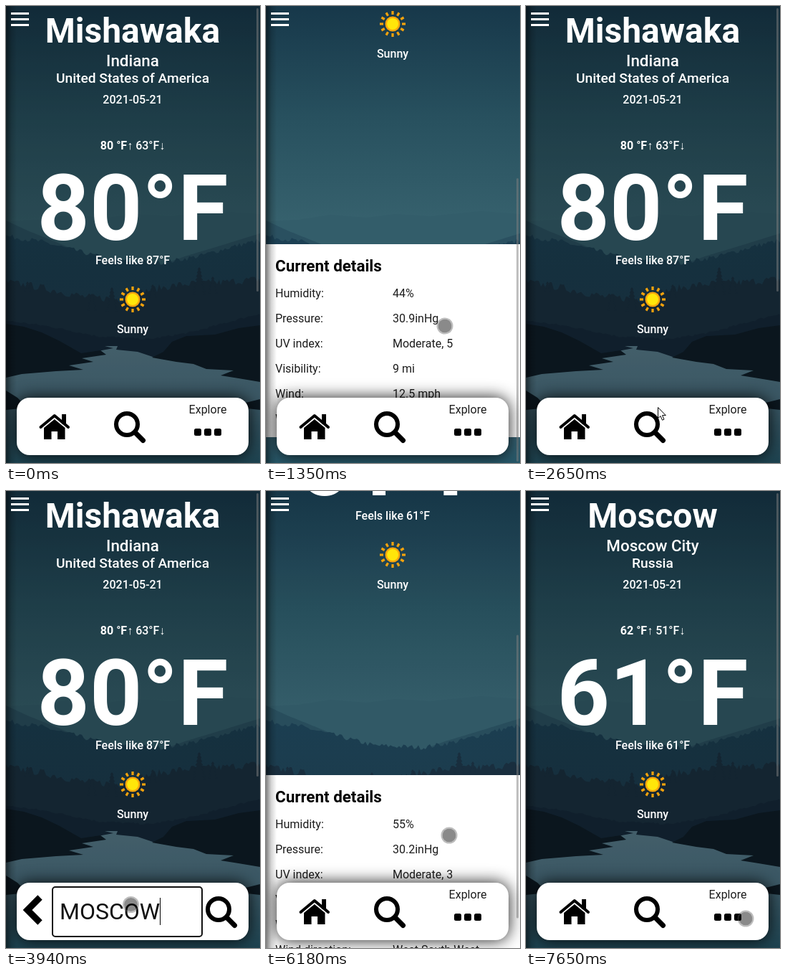
Animation, 355 px wide and 637 px high, one loop 7690 ms. Source, as an HTML page:

```html
<!DOCTYPE html>
<html lang="en">
<head>
<meta charset="utf-8">
<title>Weather</title>
<style>
html, body { margin: 0; width: 100%; height: 100%; overflow: hidden; }
#stage { position: relative; width: 355px; height: 637px; overflow: hidden; font: 16px Roboto, "Liberation Sans", sans-serif; }
#stage > *, #page > *, #nav > * { position: absolute; }
#scene, #dim { left: 0; top: 0; width: 355px; height: 637px; }
#dim { background: #000; }
#page { left: 0; top: 0; width: 355px; height: 1021px; }
.t { left: 0; width: 354px; line-height: 0; text-align: center; font-weight: 500; color: #fff; white-space: nowrap; }
.t i { font: 16px/0 "Liberation Sans", sans-serif; }
#sun { left: 157px; top: 389px; }
#panel { left: 0; top: 716px; width: 355px; height: 269px; background: #fff; }
#panel * { position: absolute; left: 13px; line-height: 0; white-space: nowrap; color: #1c1c1c; }
#panel h2 { margin: 0; top: 30px; font-size: 22.4px; color: #000; }
#panel .v { left: 177px; }
#edge { left: 0; top: 0; width: 15px; height: 637px; background: linear-gradient(90deg, rgba(0,0,0,.5), rgba(0,0,0,.16) 50%, transparent); }
#burger { left: 7px; top: 9px; width: 25px; height: 3px; background: #fff; box-shadow: 0 8px #fff, 0 16px #fff; }
#thumb { left: 350px; top: 3px; width: 3px; height: 395px; border-radius: 2px; background: rgba(128,128,128,.5); }
#nav { left: 15px; top: 546px; width: 324px; height: 80px; border-radius: 18px; background: #fff; box-shadow: 0 0 22px rgba(0,0,0,.9); }
#nav svg { left: -15px; top: -546px; }
#explore { left: 207px; width: 120px; top: 17px; line-height: 0; text-align: center; color: #1c1c1c; }
#field { left: 49px; top: 5px; width: 207px; height: 67px; border: 2px solid #111; border-radius: 5px; font-size: 32px; color: #111; }
#typed { position: absolute; left: 9px; top: 33px; line-height: 0; }
#caret { position: absolute; left: 100%; top: -19px; width: 1px; height: 38px; background: #000; }
#touch { left: -11.5px; top: -11.5px; width: 19px; height: 19px; border: 2px solid rgba(90,90,90,.4); border-radius: 50%; background: rgba(0,0,0,.46); background-clip: padding-box; }
#cursor > * { position: absolute; }
</style>
</head>
<body>
<div id="stage">
  <svg id="scene" viewBox="0 0 355 637">
    <defs>
      <linearGradient id="sky" x2="0" y2="1">
        <stop offset="0" stop-color="#17384a"/><stop offset=".5" stop-color="#28515f"/><stop offset="1" stop-color="#38636f"/>
      </linearGradient>
      <linearGradient id="mist" x2="0" y2="1">
        <stop offset="0" stop-color="#1c4054"/><stop offset="1" stop-color="#1d3e50"/>
      </linearGradient>
      <linearGradient id="water" x2="0" y2="1">
        <stop offset="0" stop-color="#587c8b"/><stop offset=".5" stop-color="#4b7182"/><stop offset="1" stop-color="#265768"/>
      </linearGradient>
    </defs>
    <rect width="355" height="320" fill="url(#sky)"/>
    <rect y="320" width="355" height="80" fill="#335c6a"/>
  </svg>
  <div id="dim"></div>
  <div id="page">
    <div class="t" id="city" style="top:35px;font-size:48px;font-weight:700"></div>
    <div class="t" id="region" style="top:76px;font-size:22.4px"></div>
    <div class="t" id="country" style="top:101px;font-size:19.2px"></div>
    <div class="t" style="top:131px">2021-05-21</div>
    <div class="t" style="top:195px"><b id="high"></b><i>↑</i> <span id="low"></span><i>↓</i></div>
    <div class="t" id="temp" style="top:282px;font-size:128px;font-weight:700"></div>
    <div class="t" id="feels" style="top:355px"></div>
    <svg id="sun" width="40" height="40" viewBox="-20 -20 40 40"></svg>
    <div class="t" style="top:451px">Sunny</div>
    <div id="panel"><h2>Current details</h2></div>
  </div>
  <div id="edge"></div>
  <div id="burger"></div>
  <div id="thumb"></div>
  <div id="nav">
    <svg width="355" height="637">
      <g id="home">
        <path d="M48.5 587L67.8 571L87 587" fill="none" stroke="#000" stroke-width="4" stroke-linecap="round" stroke-linejoin="round"/>
        <path d="M78 569h6v14h-6zM53 588L67.8 576L82.500 588V604H72V593H63.500V604H53z"/>
        <rect x="263" y="589" width="10" height="10" rx="2.500"/>
        <rect x="277" y="589" width="10" height="10" rx="2.500"/>
        <rect x="291" y="589" width="10" height="10" rx="2.500"/>
      </g>
      <path id="back" d="M47.500 566.500L30 584L47.500 601.500" fill="none" stroke="#000" stroke-width="9"/>
      <g id="lens" fill="none" stroke="#000">
        <circle cx="169" cy="583" r="15" stroke-width="6"/>
        <path d="M181 595L191.500 605.500" stroke-width="7" stroke-linecap="round"/>
      </g>
    </svg>
    <div id="explore">Explore</div>
    <div id="field"><span id="typed"><span id="word"></span><i id="caret"></i></span></div>
  </div>
  <div id="cursor">
    <div id="touch"></div>
    <svg id="arrow" width="13" height="20"><path d="M.5 .8V16L4 12.800L6.500 18.500L9 17.400L6.500 11.900H11.300Z" fill="#fff" stroke="#000"/></svg>
  </div>
</div>
<script>
const LOOP = 7690, MAX_SCROLL = 384;
const $ = id => document.getElementById(id);
const scene = $('scene');

let seed = 7;
const rand = () => (seed = seed * 16807 % 2147483647) / 2147483647;

function addPath(parent, d, fill) {
  const path = document.createElementNS('http://www.w3.org/2000/svg', 'path');
  path.setAttribute('d', d);
  path.setAttribute('fill', fill);
  parent.append(path);
}

// Filled ridge through the points; rough adds treetops.
function ridge(points, bottom, fill, rough = 0) {
  let d = `M${points[0][0]} ${bottom}`;
  points.slice(1).forEach(([x1, y1], i) => {
    const [x0, y0] = points[i];
    for (let x = x0; x < x1; x += 3)
      d += `L${x} ${y0 + (y1 - y0) * (x - x0) / (x1 - x0) - rand() * rough}`;
  });
  const [x, y] = points.at(-1);
  addPath(scene, d + `L${x} ${y}V${bottom}Z`, fill);
}

function pine(x, top, h, fill) {
  let left = '', right = '';
  for (let y = 3; y < h; y += 5) {
    const w = 1.5 + y * .22;
    right += `L${x + w} ${top + y}L${x + w * .55} ${top + y + 1}`;
    left = `L${x - w * .55} ${top + y + 1}L${x - w} ${top + y}` + left;
  }
  addPath(scene, `M${x} ${top}${right}${left}Z`, fill);
}

ridge([[0, 300], [45, 298], [90, 291], [140, 295], [180, 290], [230, 293], [300, 286], [355, 290]], 400, '#335d6a');
ridge([[0, 299], [30, 313], [70, 329], [110, 346], [150, 362], [215, 362], [250, 349], [300, 334], [355, 317]], 400, '#2a5060');
ridge([[0, 324], [50, 332], [100, 345], [150, 358], [220, 361], [270, 352], [320, 338], [355, 330]], 420, 'url(#mist)', 7);
const WOOD = '#1a3040', BANK = '#0e1d27';
ridge([[0, 390], [50, 398], [110, 411], [160, 414], [205, 400], [250, 393], [300, 391], [355, 386]], 500, WOOD, 11);
[[148, 392, 34], [120, 401, 24], [270, 364, 40], [289, 377, 28], [205, 388, 20], [30, 384, 18]]
  .forEach(p => pine(...p, WOOD));
ridge([[0, 440], [60, 448], [130, 462], [200, 466], [260, 456], [355, 430]], 500, '#15293a', 3);
addPath(scene, 'M0 637V500L100 490L134 480L150 477L138 474L156 474L154 479L184 482L208 490L355 492V637Z', 'url(#water)');
addPath(scene, 'M0 443L25 447L50 455L75 467L105 484L132 480L140 486L106 491L122 496L88 501L108 507L70 509L22 513L0 518Z', BANK);
addPath(scene, 'M204 490L220 482L232 468L252 460L292 458L325 449L355 445V524L325 519L300 515L318 508L280 506L262 499L238 496Z', BANK);
addPath(scene, 'M0 536L16 546L30 560L0 563ZM355 548L335 553L328 560L355 563Z', BANK);

for (let i = 0; i < 12; i++) {
  const ray = document.createElementNS('http://www.w3.org/2000/svg', 'rect');
  for (const [k, v] of Object.entries({ x: -1.6, y: -18, width: 3.2, height: 5, fill: '#f7a30c', transform: `rotate(${i * 30})` }))
    ray.setAttribute(k, v);
  $('sun').append(ray);
}
const disc = r => `M${-r} 0a${r} ${r} 0 1 0 ${2 * r} 0a${r} ${r} 0 1 0 ${-2 * r} 0`;
addPath($('sun'), disc(10.5), '#f9a70e');
addPath($('sun'), disc(8), '#ffe60a');

const PLACES = [
  { city: 'Mishawaka', region: 'Indiana', country: 'United States of America', high: '80 °F', low: '63°F',
    temp: '80°F', feels: 'Feels like 87°F', rows: ['44%', '30.9inHg', 'Moderate, 5', '9 mi', '12.5 mph', 'South West'] },
  { city: 'Moscow', region: 'Moscow City', country: 'Russia', high: '62 °F', low: '51°F',
    temp: '61°F', feels: 'Feels like 61°F', rows: ['55%', '30.2inHg', 'Moderate, 3', '6 mi', '8.1 mph', 'West South West'] }
];
const values = ['Humidity', 'Pressure', 'UV index', 'Visibility', 'Wind', 'Wind direction'].map((name, i) => {
  const cell = (text, cls) => {
    const el = document.createElement('span');
    el.textContent = text;
    el.className = cls;
    el.style.top = 69 + 35 * i + 'px';
    $('panel').append(el);
    return el;
  };
  cell(name + ':', 'k');
  return cell('', 'v');
});

let shown = -1;
function showPlace(n) {
  if (n === shown) return;
  shown = n;
  const { rows, ...texts } = PLACES[n];
  for (const id in texts) $(id).textContent = texts[id];
  rows.forEach((text, i) => values[i].textContent = text);
}

// start, end, from, to, ease-out power
const SCROLLS = [
  [1030, 1350, 0, MAX_SCROLL, 3], [1772, 2080, MAX_SCROLL, 0, 3],
  [6022, 6420, 0, MAX_SCROLL, 3.5], [6952, 7390, MAX_SCROLL, 0, 2.06]
];
function scrollAt(t) {
  let s = 0;
  for (const [start, end, from, to, power] of SCROLLS)
    if (t >= start) s = to + (from - to) * (1 - Math.min(1, (t - start) / (end - start))) ** power;
  return Math.round(s);
}

const SEARCH_OPEN = 2950, SUBMIT = 4910, BLINK = 480;
const KEYS = [3120, 3200, 3280, 3480, 3640, 3940];

// time, x, y, look
const HIDDEN = 0, ARROW = 1, TOUCH = 2;
const MOVES = [
  [0, 283, 521, HIDDEN], [650, 283, 521, ARROW], [810, 249.5, 445.5, TOUCH],
  [2330, 249.5, 445.5, ARROW], [2700, 174, 576, ARROW], [2790, 174, 576, TOUCH],
  [5070, 174, 576, ARROW], [5150, 202, 519, ARROW], [5450, 202, 519, ARROW],
  [5500, 193, 512, ARROW], [5640, 255.5, 479.5, TOUCH], [6970, 255.5, 479.5, ARROW],
  [6980, 252, 482, ARROW], [7530, 252, 482, ARROW], [7570, 240, 475, ARROW],
  [7650, 306.5, 595.5, TOUCH], [LOOP, 306.5, 595.5, TOUCH]
];

const toggle = (id, on) => $(id).style.display = on ? '' : 'none';

function draw(t) {
  showPlace(t < SUBMIT ? 0 : 1);

  const s = scrollAt(t);
  $('page').style.transform = `translateY(${-s}px)`;
  $('thumb').style.transform = `translateY(${s * .617}px)`;
  $('dim').style.opacity = .24 * (1 - s / MAX_SCROLL);

  const searching = t >= SEARCH_OPEN && t < SUBMIT;
  for (const id of ['home', 'explore']) toggle(id, !searching);
  for (const id of ['back', 'field']) toggle(id, searching);
  $('lens').setAttribute('transform', `translate(${searching ? 128 : 0} 0)`);
  const typed = KEYS.filter(k => k <= t).length;
  $('word').textContent = 'MOSCOW'.slice(0, typed);
  toggle('caret', t - (KEYS[typed - 1] || SEARCH_OPEN) < BLINK);

  const i = MOVES.findLastIndex(m => m[0] <= t);
  const [t0, x0, y0, look] = MOVES[i];
  const [t1, x1, y1] = MOVES[i + 1];
  const p = (t - t0) / (t1 - t0);
  $('cursor').style.transform = `translate(${x0 + (x1 - x0) * p}px, ${y0 + (y1 - y0) * p}px)`;
  toggle('touch', look === TOUCH);
  toggle('arrow', look === ARROW);
}

const begin = performance.now();
function frame() {
  draw((performance.now() - begin) % LOOP);
  requestAnimationFrame(frame);
}
frame();
</script>
</body>
</html>
```
